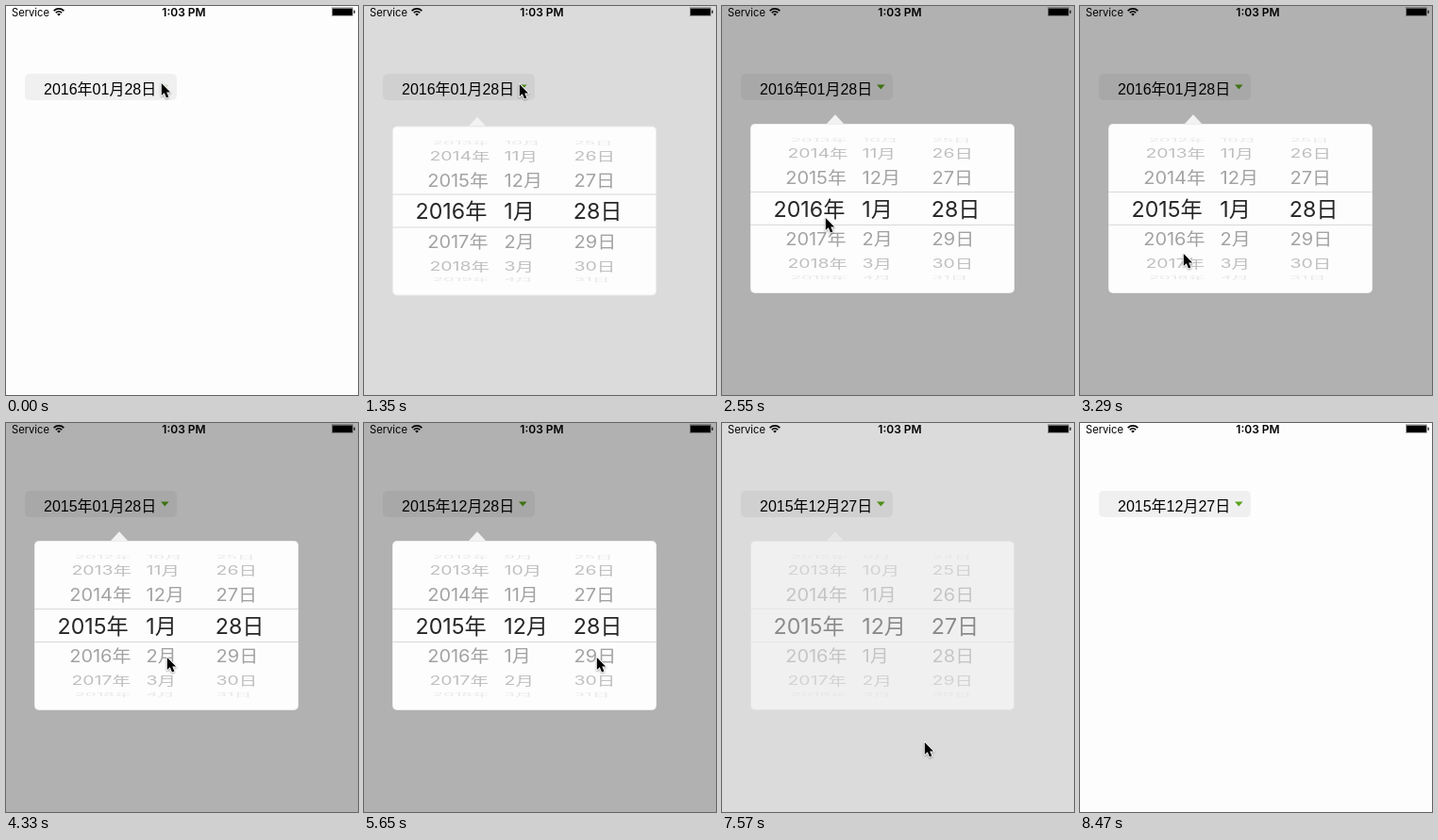
Write an HTML page with a canvas that moves like this. It is 373 px wide and 413 px high and loops after 9.4 s.

```html
<!DOCTYPE html>
<html lang="zh">
<head>
<meta charset="utf-8">
<title>Date picker</title>
<style>
html, body { margin: 0; width: 100%; height: 100%; overflow: hidden; background: #fdfdfd; }
canvas { display: block; width: 373px; height: 413px; }
</style>
</head>
<body>
<canvas id="stage"></canvas>
<script>
const W = 373, H = 413, LOOP = 9400;
const canvas = document.getElementById('stage');
const ctx = canvas.getContext('2d');
const dpr = window.devicePixelRatio || 1;
canvas.width = W * dpr;
canvas.height = H * dpr;

const CJK = '"Noto Sans CJK SC", "Noto Sans CJK JP", "Noto Sans CJK", sans-serif';
const TITLE_FONT = `16px "Liberation Sans", ${CJK}`;
const wheelFont = size => `${size}px Inter, ${CJK}`;
const BAR_FONT = 'Inter, Roboto, sans-serif';

// Each gesture drags one column back by one row; the title follows a tick later.
const TICK = 150, DRAGGED = 0.88;
const GESTURES = [
  { press: 2550, drop: 3150, settle: 3290, x: 109, y: 224, pull: 38 },
  { press: 4330, drop: 4770, settle: 4910, x: 170, y: 248, pull: 34 },
  { press: 5650, drop: 6240, settle: 6690, x: 246, y: 248, pull: 39 }
];
const FIRST_DATE = [2016, 1, 28];
const OPEN = 1350, CLOSE = 7570;

const clamp = v => Math.min(1, Math.max(0, v));
const smooth = p => p * p * (3 - 2 * p);
const ease = (t, from, to) => smooth(clamp((t - from) / (to - from)));
const wrap = (n, size) => ((n - 1) % size + size) % size + 1;

// The picture advances in ticks that slowly run ahead of an even beat.
const tickTime = k => TICK * k - 10 * Math.floor(Math.max(0, k - 18) / 4);
function snap(t) {
  let k = Math.floor(t / TICK);
  while (tickTime(k + 1) <= t) k++;
  return tickTime(k);
}

const PATH = [
  { t: 0, x: 164, y: 81 }, { t: TICK, x: 164, y: 82 }, { t: 1650, x: 164, y: 82 },
  ...GESTURES.flatMap(({ press, drop, settle, x, y, pull }) => [
    { t: press, x, y }, { t: drop, x, y: y + pull }, { t: settle, x, y: y + pull }
  ]),
  { t: 7280, x: 214, y: 338 }, { t: 8020, x: 214, y: 338 },
  { t: 8170, x: 200, y: 358 }, { t: 8470, x: 300, y: 420 }
];
function cursorAt(t) {
  const i = PATH.findIndex(point => point.t > t);
  if (i < 0) return PATH[PATH.length - 1];
  const a = PATH[i - 1], b = PATH[i], p = ease(t, a.t, b.t);
  return { x: a.x + (b.x - a.x) * p, y: a.y + (b.y - a.y) * p };
}

function wheelValue(i, t) {
  const { press, drop, settle } = GESTURES[i];
  return FIRST_DATE[i] - (t >= settle ? 1 : DRAGGED * ease(t, press, drop));
}

function titleAt(t) {
  const [y, m, d] = FIRST_DATE.map((n, i) => t >= GESTURES[i].settle + TICK ? n - 1 : n);
  const pad = n => String(n).padStart(2, '0');
  return `${y}年${pad(wrap(m, 12))}月${pad(wrap(d, 31))}日`;
}

function polygon(points) {
  ctx.beginPath();
  points.forEach(([x, y]) => ctx.lineTo(x, y));
  ctx.closePath();
}
function roundBox(x, y, w, h, r, color) {
  ctx.fillStyle = color;
  ctx.beginPath();
  ctx.roundRect(x, y, w, h, r);
  ctx.fill();
}
function text(str, x, y, font, align = 'left') {
  ctx.font = font;
  ctx.fillStyle = '#000';
  ctx.textAlign = align;
  ctx.fillText(str, x, y);
}

function drawStatusBar() {
  text('Service', 6, 10.5, `11.2px ${BAR_FONT}`);
  text('1:03 PM', 188.5, 10.5, `600 12px ${BAR_FONT}`, 'center');
  const wave = r => ctx.arc(56, 10.5, r, -Math.PI * 0.75, -Math.PI * 0.25);
  ctx.strokeStyle = '#000';
  ctx.lineWidth = 1.6;
  for (const r of [4.6, 7.6]) {
    ctx.beginPath();
    wave(r);
    ctx.stroke();
  }
  ctx.beginPath();
  ctx.moveTo(56, 10.5);
  wave(2.6);
  ctx.fill();
  ctx.strokeStyle = '#777';
  ctx.lineWidth = 0.6;
  ctx.strokeRect(345.3, 1.8, 22.4, 8.8);
  ctx.fillRect(346, 2.5, 21, 7.4);
  ctx.fillRect(368.5, 4.6, 1.2, 3.2);
}

function drawButton(t) {
  roundBox(20, 72, 161, 28, 5, '#f0f0f0');
  const now = titleAt(t), before = titleAt(t - TICK + 10);
  const layers = now === before ? [now] : [before, now];
  ctx.globalAlpha = 1 / layers.length;
  layers.forEach(title => text(title, 40, 93.5, TITLE_FONT));
  ctx.globalAlpha = t < TICK ? 0.2 : 1;
  ctx.fillStyle = '#5aa41e';
  polygon([[164, 83.5], [172.6, 83.5], [168.3, 88.6]]);
  ctx.fill();
  ctx.globalAlpha = 1;
}

const MID = 215.3, TOP = 197.5, BOTTOM = 232.5;
const ROW_ANGLE = 25.8 * Math.PI / 180, RADIUS = 74.6;
const COLUMNS = [
  { label: n => n + '年', x: 66.4, lean: 8, midX: 54.6 },
  { label: n => wrap(n, 12) + '月', x: 148.6, lean: 0, midX: 148.2 },
  { label: n => wrap(n, 31) + '日', x: 222.6, lean: 0, midX: 221.8 }
];

function clipped(y, h, draw) {
  ctx.save();
  ctx.beginPath();
  ctx.rect(30, y, 280, h);
  ctx.clip();
  draw();
  ctx.restore();
}

function drawRows(t, size, focus, alpha) {
  COLUMNS.forEach((col, i) => {
    const value = wheelValue(i, t), nearest = Math.round(value);
    for (let n = nearest - 3; n <= nearest + 3; n++) {
      const angle = (n - value) * ROW_ANGLE, c = Math.cos(angle);
      if (c < 0.05) continue;
      ctx.save();
      ctx.globalAlpha = alpha * (focus ? 0.85 : 0.4 * c);
      ctx.translate(focus ? col.midX : col.x + col.lean * (1 - c), MID + RADIUS * Math.sin(angle));
      ctx.scale(1 - 0.1 * (1 - c), c);
      text(col.label(n), 0, size * 0.36, wheelFont(size));
      ctx.restore();
    }
  });
}

function drawPicker(t, shift, alpha) {
  ctx.save();
  ctx.translate(0, shift);
  ctx.globalAlpha = alpha;
  ctx.fillStyle = '#f2f2f2';
  polygon([[111, 125], [120, 115.3], [129, 125]]);
  ctx.fill();
  roundBox(30, 125, 280, 180, 5, '#ececec');
  roundBox(31, 126, 278, 178, 4, '#fdfdfd');
  ctx.fillStyle = '#dadada';
  ctx.fillRect(30, TOP - 0.5, 280, 1);
  ctx.fillRect(30, BOTTOM - 0.5, 280, 1);
  const outer = () => drawRows(t, 20.2, false, alpha);
  clipped(138, TOP - 138.5, outer);
  clipped(BOTTOM + 0.5, 60, outer);
  clipped(TOP + 0.5, BOTTOM - TOP - 1, () => drawRows(t, 23.2, true, alpha));
  ctx.restore();
}

function drawCursor(t) {
  const { x, y } = cursorAt(t);
  ctx.save();
  ctx.translate(x + 0.8, y + 1);
  polygon([[0, 0], [0, 13], [3, 10.3], [5.2, 15.5], [7.6, 14.5], [5.4, 9.5], [9.3, 9.5]]);
  ctx.lineJoin = 'round';
  ctx.lineWidth = 1.8;
  ctx.strokeStyle = '#fff';
  ctx.shadowColor = 'rgba(0,0,0,.35)';
  ctx.shadowBlur = 2 * dpr;
  ctx.shadowOffsetY = dpr;
  ctx.stroke();
  ctx.shadowColor = 'transparent';
  ctx.fillStyle = '#000';
  ctx.fill();
  ctx.restore();
}

function draw(t) {
  ctx.setTransform(dpr, 0, 0, dpr, 0, 0);
  ctx.globalAlpha = 1;
  ctx.fillStyle = '#fdfdfd';
  ctx.fillRect(0, 0, W, H);
  drawStatusBar();
  drawButton(t);
  if (t >= OPEN && t < CLOSE + TICK - 10) {
    const opening = t < OPEN + TICK, closing = t >= CLOSE;
    ctx.fillStyle = `rgba(0,0,0,${opening || closing ? 0.135 : 0.3})`;
    ctx.fillRect(0, 0, W, H);
    drawPicker(t, opening ? 2.5 : 0, closing ? 0.5 : 1);
  }
  drawCursor(t);
}

const start = performance.now();
function frame() {
  draw(snap((performance.now() - start) % LOOP));
  requestAnimationFrame(frame);
}
frame();
</script>
</body>
</html>
```
